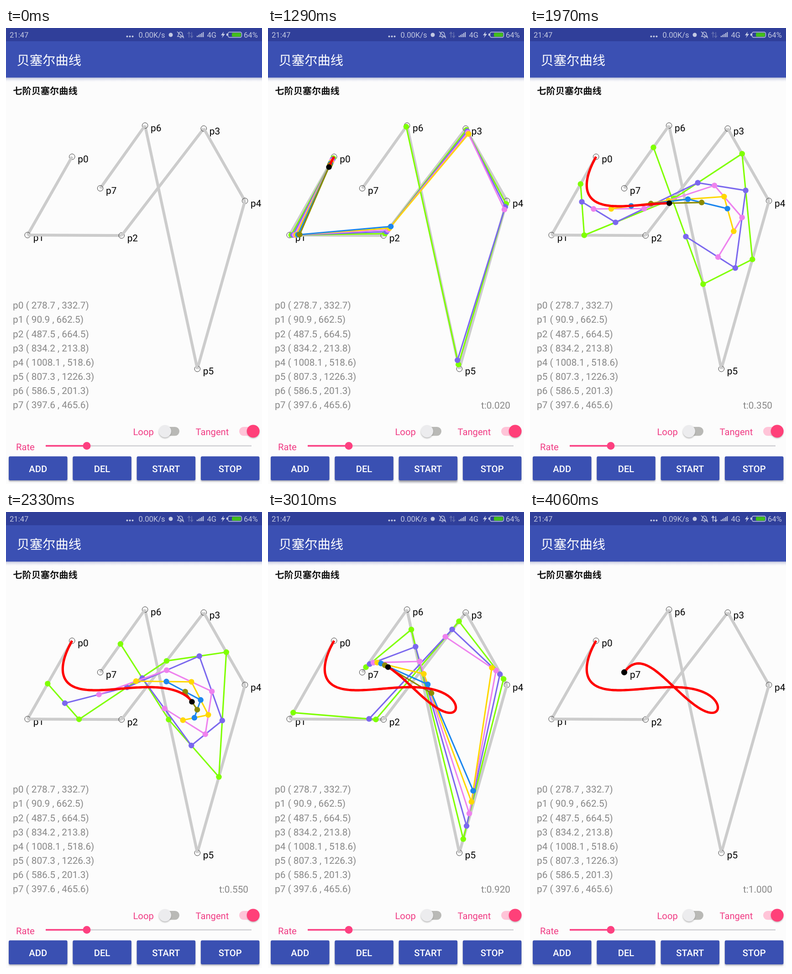
These frames come from a looping animation (561 px wide and 998 px high, 4.87 s). An HTML page:

```html
<!DOCTYPE html>
<html lang="zh-CN">
<head>
<meta charset="utf-8">
<title>贝塞尔曲线</title>
<style>
  html, body { margin: 0; width: 100%; height: 100%; overflow: hidden; background: #fcfcfc; }
  svg { display: block; width: 100%; height: 100%; }
  text { font-family: Roboto, "Noto Sans CJK SC", sans-serif; white-space: pre; text-rendering: geometricPrecision; }
  .cjk { font-family: "Noto Sans CJK SC", "Noto Sans CJK", sans-serif; }
  .status { font-size: 16.6px; fill: #c3c9e2; }
  .label, .info { font-size: 20.78px; }
  .info { fill: #888; }
  .pink { font-size: 20.2px; fill: #f03c84; }
  .button { font-size: 20.2px; font-weight: 500; fill: #fff; text-anchor: middle; }
</style>
</head>
<body>
<svg viewBox="0 0 561 998" preserveAspectRatio="none">
  <defs>
    <linearGradient id="drop" x2="0" y2="1">
      <stop offset="0" stop-color="#8088b4" stop-opacity=".5"/>
      <stop offset="1" stop-color="#c8ccec" stop-opacity="0"/>
    </linearGradient>
    <filter id="blur" x="-20%" y="-40%" width="140%" height="180%">
      <feGaussianBlur stdDeviation="1.8"/>
    </filter>
  </defs>
  <rect width="561" height="998" fill="#fcfcfc"/>
  <rect y="108" width="561" height="10" fill="url(#drop)"/>
  <rect y="28" width="561" height="80.5" fill="#3b50b3"/>
  <rect width="561" height="29" fill="#303f9a"/>

  <text class="status" x="8" y="21">21:47</text>
  <text class="status" x="290.5" y="21" id="speed"></text>
  <text class="status" x="440.5" y="21">4G</text>
  <text class="status" x="521" y="21">64%</text>
  <g fill="#c3c9e2">
    <circle cx="265.5" cy="18.5" r="2"/><circle cx="271.5" cy="18.5" r="2"/><circle cx="277.5" cy="18.5" r="2"/>
    <circle cx="361" cy="15" r="4.5"/>
    <path d="M418 20v-3h2v3zM421.3 20v-5h2v5zM424.6 20v-7h2v7zM428 20v-9h2v9zM431.3 20v-11h2v11z"/>
    <path d="M477 8l-6 8h4l-2 6 7-9h-4z"/>
    <rect x="483" y="12" width="3" height="5" rx="1"/>
  </g>
  <g fill="none" stroke="#c3c9e2" stroke-width="1.4">
    <path d="M376 18.5h12.5c-2-2-1.5-4-2-6.5a4.3 4.3 0 0 0-8.3 0c-.4 2.5 0 4.5-2.2 6.5zM380.5 21h4M375 8l15 14"/>
    <rect x="486.5" y="9" width="30" height="11.5" rx="3.5"/>
  </g>
  <rect x="495" y="10.5" width="20" height="8.5" rx="2" fill="#43bf1b"/>
  <path id="arrows" d="M401 21V9.5M398 13l3-4 3 4M407 9v11.5M404 17l3 4 3-4" fill="none" stroke-width="1.8"/>

  <text class="cjk" x="23.5" y="80.5" font-size="28.3" fill="#fff">贝塞尔曲线</text>
  <text class="cjk" x="15.3" y="145.3" font-size="20.2" font-weight="700" fill="#111">七阶贝塞尔曲线</text>

  <g id="polygon"></g>
  <g id="tangents"></g>
  <path id="curve" fill="none" stroke="#f00" stroke-width="5.2" stroke-linejoin="round"/>
  <circle id="tip" r="6.23"/>
  <g id="list"></g>
  <text class="info" id="clock" x="467" y="832.5"></text>

  <text class="pink" x="278.5" y="891">Loop</text>
  <text class="pink" x="415.5" y="891">Tangent</text>
  <text class="pink" x="22" y="924">Rate</text>
  <rect x="337" y="873" width="43" height="19.5" rx="9.75" fill="#b9b9b6"/>
  <circle cx="348.5" cy="884.5" r="13.5" fill="#777" opacity=".5" filter="url(#blur)"/>
  <circle cx="348.5" cy="882.5" r="13.5" fill="#ececee"/>
  <rect x="511" y="873" width="43" height="19.5" rx="9.75" fill="#ffc4d8"/>
  <circle cx="541.7" cy="884.5" r="13.5" fill="#777" opacity=".5" filter="url(#blur)"/>
  <circle cx="541.7" cy="882.5" r="14" fill="#ff4079"/>
  <path d="M177 914.5H538" stroke="#d6d6da" stroke-width="3"/>
  <path d="M87 914.5H177" stroke="#fa3e82" stroke-width="3.3"/>
  <circle cx="177" cy="914.5" r="8.5" fill="#fd4080"/>
  <g id="buttons"></g>
</svg>
<script>
const $ = id => document.getElementById(id);
const LOOP = 4870, STEP = 40, SCALE = 561 / 1080, TOP = 109, R = 12 * SCALE;
const RAW = [[278.7, 332.7], [90.9, 662.5], [487.5, 664.5], [834.2, 213.8],
             [1008.1, 518.6], [807.3, 1226.3], [586.5, 201.3], [397.6, 465.6]];
const POINTS = RAW.map(([x, y]) => [x * SCALE, y * SCALE + TOP]);
const COLORS = ['#7fff00', '#7b68ee', '#ee82ee', '#ffd700', '#1c86ee', '#8b8b00'];
// [ms, curve parameter]
const KEYS = [[1250, 0], [1290, .02], [1650, .18], [2330, .55], [2650, .73], [3010, .92], [3170, 1]];
const START = KEYS[0][0], END = 3170;
const LAG = .002; // the tangents trail the tip slightly

const line = (a, b, color, width) =>
  `<path d="M${a}L${b}" stroke="${color}" stroke-width="${width}"/>`;
const dot = (p, attrs) => `<circle cx="${p[0]}" cy="${p[1]}" r="${R}" ${attrs}/>`;
const clamp = v => Math.max(0, Math.min(1, v));

// One round of linear interpolation between neighbours
const reduce = (pts, t) => pts.slice(1).map((b, i) =>
  pts[i].map((v, k) => v + (b[k] - v) * t));

function levels(t) {
  const out = [];
  for (let pts = POINTS; pts.length > 1;) out.push(pts = reduce(pts, t));
  return out;
}

const at = t => levels(t).pop()[0];
const trail = Array.from({ length: 201 }, (_, i) => at(i / 200));

function param(ms) {
  const i = KEYS.findIndex(k => k[0] > ms);
  if (i < 0) return 1;
  if (i === 0) return 0;
  const [a, u] = KEYS[i - 1], [b, v] = KEYS[i];
  return Math.round((u + (v - u) * (ms - a) / (b - a)) * 100) / 100;
}

function build() {
  $('polygon').innerHTML = POINTS.map((p, i) =>
    (i ? line(POINTS[i - 1], p, '#ccc', 6.2) : '') +
    dot(p, 'fill="none" stroke="#222" stroke-width=".9"') +
    `<text class="label" x="${p[0] + 2 * R}" y="${p[1] + 2 * R}">p${i}</text>`).join('');
  $('list').innerHTML = RAW.map(([x, y], i) =>
    `<text class="info" x="15" y="${614.3 + i * 31.17}">p${i} ( ${x.toFixed(1)} , ${y.toFixed(1)})</text>`).join('');
  $('buttons').innerHTML = ['ADD', 'DEL', 'START', 'STOP'].map((name, i) => {
    const x = 6 + i * 140.3;
    const box = (y, attrs) => `<rect x="${x}" y="${y}" width="128.5" height="52.5" rx="3" ${attrs}/>`;
    return box(940, 'fill="#556" opacity=".45" filter="url(#blur)"') +
      (i === 2 ? box(943, 'id="lift" fill="#445" filter="url(#blur)"') : '') +
      box(937.5, 'fill="#3a50b2"') +
      (i === 2 ? box(937.5, 'id="ripple" fill="#fff"') : '') +
      `<text class="button" x="${x + 64.25}" y="972">${name}</text>`;
  }).join('');
}

function drawTangents(t) {
  return levels(t).slice(0, -1).map((pts, n) => pts.map((p, i) =>
    (i ? line(pts[i - 1], p, COLORS[n], 3.1) : '') +
    dot(p, `fill="${COLORS[n]}"`)).join('')).join('');
}

function render(now) {
  const ms = now % LOOP;
  const frame = Math.min(END, END + STEP * Math.floor((ms - END) / STEP));
  const started = frame >= START, running = started && frame < END;
  const t = param(frame), tip = at(t);

  $('tangents').innerHTML = running ? drawTangents(clamp(t - LAG)) : '';
  const path = trail.slice(0, Math.round(t * 200) + 1);
  $('curve').setAttribute('d', started ? 'M' + path.join('L') : '');
  $('tip').setAttribute('cx', tip[0]);
  $('tip').setAttribute('cy', tip[1]);
  $('tip').style.display = started ? '' : 'none';
  $('clock').textContent = started ? 't:' + t.toFixed(3) : '';

  const press = ms < 1000 ? 0 : clamp((ms - 1000) / 80) * clamp((1500 - ms) / 350);
  $('lift').setAttribute('opacity', press * .4);
  $('ripple').setAttribute('opacity', press * .03);

  const busy = ms >= 4060;
  $('speed').textContent = busy ? '0.09K/s' : '0.00K/s';
  $('arrows').setAttribute('stroke', busy ? '#c3c9e2' : '#5f6bae');
}

build();
const begin = performance.now();
function tick() {
  render(performance.now() - begin);
  requestAnimationFrame(tick);
}
tick();
</script>
</body>
</html>
```
